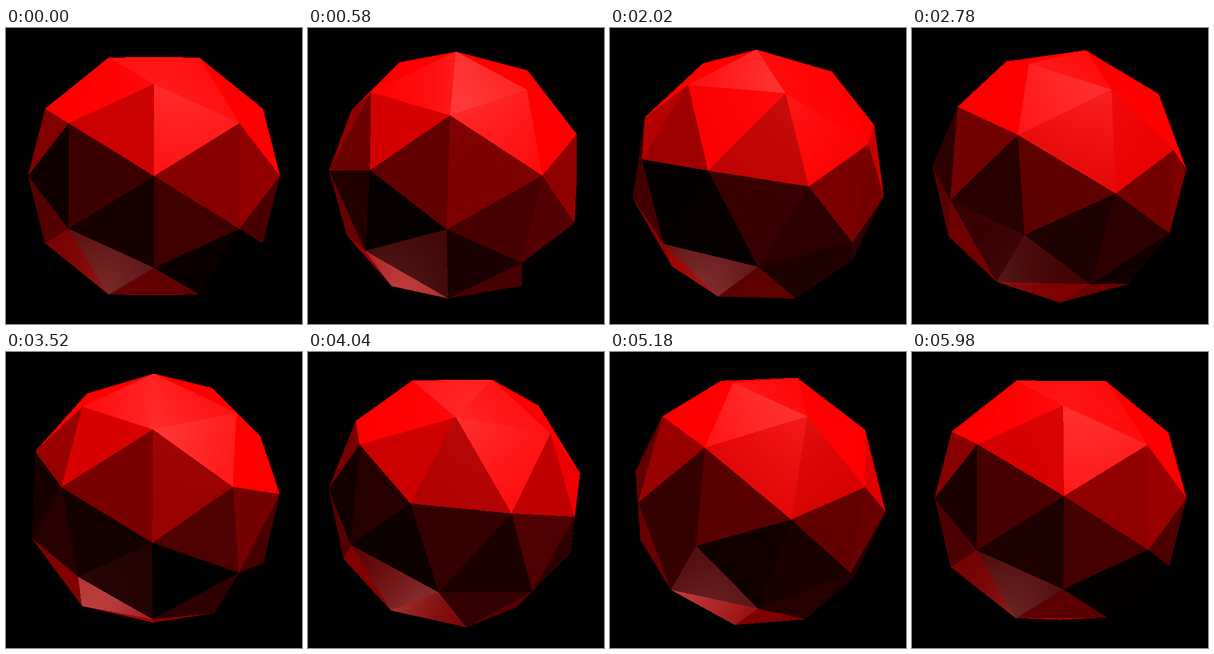
Recreate the animation shown at these times as an HTML page with a canvas. Size 500 by 500 pixels, loop 6 s.

```html
<!DOCTYPE html>
<html lang="en">
<head>
<meta charset="utf-8">
<title>Rotating red polyhedron</title>
<style>
  html, body { margin: 0; width: 100%; height: 100%; overflow: hidden; background: #000; }
  canvas { display: block; width: 500px; height: 500px; }
</style>
</head>
<body>
<canvas id="stage" width="500" height="500"></canvas>
<script>
const SIZE = 500, MID = SIZE / 2;
const LOOP = 6000, STEP = 20;
const EYE = 8 / 3;                                  // camera distance in sphere radii
const FOCAL = MID / Math.tan(25 * Math.PI / 180);   // 50 degree field of view
const SPECULAR = 17 / 255, SHININESS = 30;

const sub = (a, b) => a.map((v, i) => v - b[i]);
const dot = (a, b) => a[0] * b[0] + a[1] * b[1] + a[2] * b[2];
const cross = (a, b) => [
  a[1] * b[2] - a[2] * b[1],
  a[2] * b[0] - a[0] * b[2],
  a[0] * b[1] - a[1] * b[0]
];
const unit = a => a.map(v => v / Math.hypot(...a));
const middle = (a, b) => unit(a.map((v, i) => v + b[i]));

const LIGHTS = [[0, 1, 0], [1, 2, 1], [-1, -2, -1]].map(unit);

// Icosahedron with every face split in four and pushed out to the sphere
function buildFaces() {
  const phi = (1 + Math.sqrt(5)) / 2, points = [], faces = [];
  for (const s of [-1, 1]) for (const t of [-phi, phi]) {
    points.push(unit([0, s, t]), unit([s, t, 0]), unit([t, 0, s]));
  }
  const near = (a, b) => dot(a, b) > 0.4;
  points.forEach((a, i) => points.forEach((b, j) => points.forEach((c, k) => {
    if (i < j && j < k && near(a, b) && near(b, c) && near(a, c)) {
      const ab = middle(a, b), bc = middle(b, c), ca = middle(c, a);
      faces.push([a, ab, ca], [b, bc, ab], [c, ca, bc], [ab, bc, ca]);
    }
  })));
  return faces;
}

const faces = buildFaces();
const ctx = document.getElementById("stage").getContext("2d");
const image = ctx.createImageData(SIZE, SIZE);
const pixels = new Uint32Array(image.data.buffer);
const BLACK = 0xff000000;

function rotate([x, y, z], c, s) {
  const depth = x * s + z * c;
  return [x * c - z * s, y * c - depth * s, y * s + depth * c];
}

function project([x, y, z]) {
  const k = FOCAL / (EYE - z);
  return [MID + x * k, MID - y * k];
}

// Blinn-Phong highlight with Fresnel, for the view ray through one pixel
function highlight(x, y, normal, lit) {
  let vx = (MID - x) / FOCAL, vy = (y - MID) / FOCAL;
  const vz = 1 / Math.sqrt(vx * vx + vy * vy + 1);
  vx *= vz;
  vy *= vz;
  const nv = normal[0] * vx + normal[1] * vy + normal[2] * vz;
  let sum = 0;
  for (const { dir, nl } of lit) {
    const lv = dir[0] * vx + dir[1] * vy + dir[2] * vz;
    const len = Math.sqrt(2 + 2 * lv);
    const nh = (nl + nv) / len;
    if (nh < 0.75) continue;
    const lh = (1 + lv) / len;
    const fresnel = 2 ** ((-5.55473 * lh - 6.98316) * lh);
    const tint = SPECULAR + (1 - SPECULAR) * fresnel;
    sum += nl * tint * (SHININESS / 2 + 1) / 4 * nh ** SHININESS;
  }
  return sum;
}

function fillFace(corners, normal) {
  const lit = LIGHTS.map(dir => ({ dir, nl: dot(dir, normal) })).filter(l => l.nl > 0);
  const diffuse = lit.reduce((sum, l) => sum + l.nl, 0);
  const ys = corners.map(p => p[1]);
  const top = Math.max(0, Math.ceil(Math.min(...ys) - 0.5));
  const end = Math.min(SIZE, Math.ceil(Math.max(...ys) - 0.5));
  for (let row = top; row < end; row++) {
    const y = row + 0.5;
    let left = Infinity, right = -Infinity;
    for (let i = 0; i < 3; i++) {
      const [ax, ay] = corners[i], [bx, by] = corners[(i + 1) % 3];
      if ((ay <= y) === (by <= y)) continue;
      const x = ax + (bx - ax) * (y - ay) / (by - ay);
      left = Math.min(left, x);
      right = Math.max(right, x);
    }
    const stop = Math.ceil(right - 0.5);
    for (let col = Math.ceil(left - 0.5); col < stop; col++) {
      const shine = highlight(col + 0.5, y, normal, lit);
      const r = Math.min(255, Math.round((diffuse + shine) * 255));
      const g = Math.min(255, Math.round(shine * 255));
      pixels[row * SIZE + col] = BLACK | g << 16 | g << 8 | r;
    }
  }
}

function draw(angle) {
  const c = Math.cos(angle), s = Math.sin(angle);
  pixels.fill(BLACK);
  for (const face of faces) {
    const p = face.map(v => rotate(v, c, s));
    let normal = unit(cross(sub(p[1], p[0]), sub(p[2], p[0])));
    if (dot(normal, p[0]) < 0) normal = normal.map(v => -v);
    if (normal[2] * EYE > dot(normal, p[0])) fillFace(p.map(project), normal);
  }
  ctx.putImageData(image, 0, 0);
}

const start = performance.now();
let shown = -1;

function tick() {
  const time = Math.max(0, performance.now() - start) % LOOP;
  const step = Math.floor(time / STEP);
  if (step !== shown) {
    shown = step;
    draw(step * STEP / LOOP * 2 * Math.PI);
  }
  requestAnimationFrame(tick);
}
tick();
</script>
</body>
</html>
```
